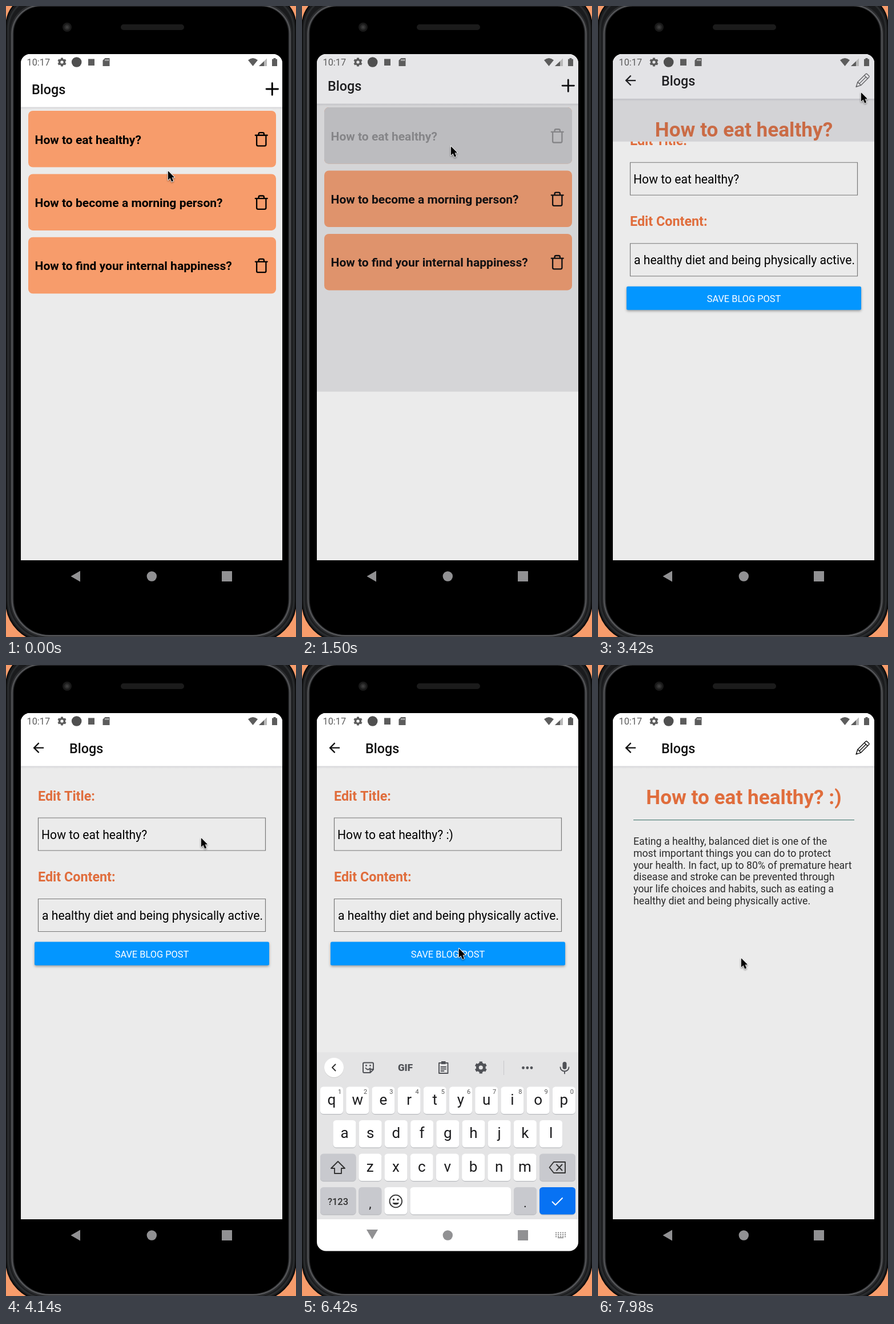
Animation of 508 by 1102 pixels, one loop 8 s. Source, as an HTML page with a canvas:

```html
<!DOCTYPE html>
<html lang="en">
<head>
<meta charset="utf-8">
<title>Blog app</title>
<style>
html, body { margin: 0; width: 100%; height: 100%; overflow: hidden; background: #f79c6b; }
canvas { display: block; width: 508px; height: 1102px; }
</style>
</head>
<body>
<canvas width="508" height="1102"></canvas>
<script>
const c = document.querySelector('canvas').getContext('2d');
const LOOP = 8000, X = 26, Y = 84, W = 458, H = 884, DP = 1.164;
const ORANGE = '#f79c6b', TITLE = '#e06d3c', PAPER = '#ebebeb', GREY = '#5c5c5c', KEY_ICON = '#505257';

// Moments of the story, in ms
const OPEN = 1464, EDIT = 3287, FOCUS = 4180, SAVE = 7000, SLIDE = 425;
const KEYSTROKES = [5150, 5430, 5700];
const POINTER = [
  [300, 283, 286], [1000, 260, 243], [1750, 260, 243], [2400, 415, 178], [2980, 460, 149],
  [3420, 460, 149], [3880, 341, 300], [5780, 341, 300], [6400, 274, 493], [6800, 270, 497],
  [7050, 270, 497], [7700, 250, 510]
];
const BODY = [
  'Eating a healthy, balanced diet is one of the',
  'most important things you can do to protect',
  'your health. In fact, up to 80% of premature heart',
  'disease and stroke can be prevented through',
  'your life choices and habits, such as eating a',
  'healthy diet and being physically active.'
];

const clamp = v => Math.max(0, Math.min(1, v));
const mix = (a, b, k) => a + (b - a) * k;
const ramp = (t, start, length) => clamp((t - start) / length);
const smooth = k => k * k * (3 - 2 * k);

// cubic-bezier(.20833, .82, .25, 1)
function slide(k) {
  const curve = (s, a, b) => 3 * (1 - s) * (1 - s) * s * a + 3 * (1 - s) * s * s * b + s * s * s;
  if (k <= 0 || k >= 1) return clamp(k);
  let lo = 0, hi = 1;
  for (let i = 0; i < 24; i++) {
    const mid = (lo + hi) / 2;
    if (curve(mid, .20833, .25) < k) lo = mid; else hi = mid;
  }
  return curve(lo, .82, 1);
}

// Drawing helpers
function text(s, x, y, size, color, weight = 400, align = 'left') {
  c.font = `${weight} ${size}px Roboto, sans-serif`;
  c.textAlign = align;
  c.fillStyle = color;
  c.fillText(s, x, y);
}
function rect(x, y, w, h, color) {
  c.fillStyle = color;
  c.fillRect(x, y, w, h);
}
function box(x, y, w, h, r, fill, stroke, width = 1) {
  c.beginPath();
  c.roundRect(x, y, w, h, r);
  if (fill) { c.fillStyle = fill; c.fill(); }
  if (stroke) { c.strokeStyle = stroke; c.lineWidth = width; c.stroke(); }
}
function disc(x, y, r, color) {
  c.beginPath();
  c.arc(x, y, r, 0, 7);
  c.fillStyle = color;
  c.fill();
}
function shape(d, x, y, scale, fill, stroke, width = 2) {
  const p = new Path2D(d);
  c.save();
  c.translate(x, y);
  c.scale(scale, scale);
  c.lineCap = c.lineJoin = 'round';
  if (stroke) { c.strokeStyle = stroke; c.lineWidth = width; c.stroke(p); }
  if (fill) { c.fillStyle = fill; c.fill(p); }
  c.restore();
}
function faded(alpha, draw) {
  c.save();
  c.globalAlpha *= alpha;
  draw();
  c.restore();
}
function gear(x, y, r, color) {
  c.strokeStyle = color;
  c.lineCap = 'butt';
  c.beginPath();
  c.arc(x, y, r * .57, 0, 7);
  c.lineWidth = r * .46;
  c.stroke();
  c.beginPath();
  for (let i = 0; i < 6; i++) {
    const a = i * Math.PI / 3 + Math.PI / 6;
    c.moveTo(x + Math.cos(a) * r * .6, y + Math.sin(a) * r * .6);
    c.lineTo(x + Math.cos(a) * r, y + Math.sin(a) * r);
  }
  c.lineWidth = r * .5;
  c.stroke();
}

function phone() {
  rect(0, 0, 508, 1102, ORANGE);
  box(0, -22, 508, 1132, [58, 58, 70, 70], '#1a1b1d', '#0a0a0a', 2);
  box(4, -16, 500, 1122, [56, 56, 68, 68], null, '#2a2c2e', 3);
  box(10.5, -2, 487, 1103, [50, 50, 65, 65], '#000', '#2b2c2e', 6);
  box(10.5, -1, 487, 1101, [50, 50, 65, 65], null, '#58595c', 2);
  disc(107, 37, 8, '#191919');
  disc(107, 37, 5, '#2b2b2b');
  disc(107, 37, 2.5, '#3c3c3c');
  box(201, 32, 111, 10, 5, '#1b1b1b');
}

function statusBar() {
  text('10:17', 36.5, 104, 16.3, GREY);
  gear(98, 98, 7.6, GREY);
  disc(123.7, 98, 8.8, '#4f4f4f');
  rect(144, 92.5, 11, 11.5, GREY);
  shape('M4 0h8v14H0V4z', 169.5, 91, 1, GREY);
  for (const x of [173.5, 176, 178.5]) rect(x, 93, 1.3, 3, '#ddd');
  shape('M0 3.5Q8.5-3.5 17 3.5L8.5 14z', 424, 91, 1, GREY);
  shape('M14 0V13.5H0z', 443, 91.5, 1, '#b9b9b9');
  shape('M9 5V13.5H0z', 443, 91.5, 1, GREY);
  shape('M2.5 0h4v1.7H9V14H0V1.7h2.5z', 466, 91, 1, GREY);
}

function page(titleX) {
  rect(X, Y, W, H + 60, PAPER);
  rect(X, Y, W, 93, '#fff');
  const g = c.createLinearGradient(0, 176, 0, 181);
  g.addColorStop(0, '#d3d3d6');
  g.addColorStop(1, PAPER);
  rect(X, 176.5, W, 4.5, g);
  text('Blogs', titleX, 154, 23.35, '#111', 500);
}
function backArrow() {
  shape('M20 11H7.83l5.59-5.59L12 4l-8 8 8 8 1.41-1.41L7.83 13H20z', 42.8, 130.7, DP, '#111');
}

function listPage(t) {
  page(45);
  shape('M12 5v14M5 12h14', 448.8, 127.5, 1.458, null, '#000');
  const press = ramp(t, 1310, 110) * (1 - ramp(t, 1500, 250));
  ['How to eat healthy?', 'How to become a morning person?', 'How to find your internal happiness?'].forEach((s, i) => {
    const y = 183 + i * 110.4, held = i ? 0 : press;
    box(39, y, 434, 98.5, 8, ORANGE);
    if (held) faded(held, () => box(39, y, 434, 98.5, 8, '#cdcdcf'));
    faded(1 - held * .68, () => {
      text(s, 50.5, y + 57.5, 21.05, '#000', 700);
      shape('M3 6h18M19 6v14a2 2 0 0 1-2 2H7a2 2 0 0 1-2-2V6m3 0V4a2 2 0 0 1 2-2h4a2 2 0 0 1 2 2v2',
        433.3, y + 35.8, DP, null, '#000');
    });
  });
}

function detailPage(t) {
  page(111);
  backArrow();
  const press = ramp(t, 2890, 110) * (1 - smooth(ramp(t, EDIT, 250)));
  faded(1 - press * .8, () => {
    c.save();
    c.translate(462.7, 145.3);
    c.rotate(Math.PI / 4);
    shape('M0 15L-4 7V-12.5Q-4-14.5-2-14.5H2Q4-14.5 4-12.5V7zM-4-9.5H4M-4 7H4M0 7V-9.5M-1 13h2',
      0, 0, 1, null, '#111', 1.4);
    c.restore();
  });
  text('How to eat healthy?' + (t > SAVE - 50 ? ' :)' : ''), 255.5, 243, 35.15, TITLE, 700, 'center');
  rect(62, 270, 387, 1.2, '#4f8078');
  BODY.forEach((s, i) => text(s, 62, 314.2 + i * 20.7, 17.72, '#2b2b2b'));
}

function editPage(t) {
  page(111);
  backArrow();
  const typed = KEYSTROKES.filter(k => t >= k).length;
  const value = 'How to eat healthy?' + ' :)'.slice(0, typed);
  text('Edit Title:', 56, 236.5, 23.35, TITLE, 700);
  box(56.5, 267, 398, 57, 0, null, '#777', 1.2);
  text(value, 62, 303.5, 21.15, '#000');
  const since = t - (typed ? KEYSTROKES[typed - 1] : FOCUS);
  if (t > FOCUS && t < SAVE && since % 1000 < 500)
    rect(62.5 + c.measureText(value).width, 282, 2, 28, '#3f5f5c');
  text('Edit Content:', 56, 378, 23.35, TITLE, 700);
  box(56.5, 408.5, 398, 57, 0, null, '#777', 1.2);
  text('a healthy diet and being physically active.', 63, 445, 21.15, '#000');
  c.save();
  c.shadowColor = 'rgba(0,0,0,.35)';
  c.shadowBlur = 4;
  c.shadowOffsetY = 2;
  box(50, 483.5, 411, 41, 2.5, '#0396ff');
  c.restore();
  text('SAVE BLOG POST', 255.5, 510.5, 16.4, '#fff', 400, 'center');
}

// A page is revealed upward from the bottom while the one below drifts up and dims
function card(draw, t, shown, covered) {
  if (!shown) return;
  if (shown < 1) rect(X, Y, W, H, `rgba(100,100,112,${.175 * clamp(shown / .36)})`);
  c.save();
  c.beginPath();
  c.rect(X, Y + H * (1 - shown), W, H);
  c.clip();
  c.translate(0, H * (.041 * (1 - shown) - .02 * covered));
  draw(t);
  c.restore();
}

function key(x, y, w, label, fill = '#fff', size = 26) {
  box(x, y + 1.2, w, 47.5, 5.5, '#b9bbbf');
  box(x, y, w, 47.5, 5.5, fill);
  text(label, x + w / 2, y + 31, size, '#1b1b1d', 400, 'center');
}
function keyboard() {
  const step = 45.2, special = '#c8c9ce';
  rect(X, 676.5, W, 291.5, '#e4e4e5');
  disc(56, 704, 17, '#ccc');
  disc(56, 703, 17, '#fff');
  shape('M58.5 697.5L53 703l5.5 5.5', 0, 0, 1, null, '#333');
  shape('M109 694.5h14q2 0 2 2v10l-5.5 5.5H109q-2 0-2-2v-13.5q0-2 2-2zM125 706h-5.5v6M111.5 704q4 5 8 0',
    0, 0, 1, null, KEY_ICON);
  disc(112.5, 699.5, 1.4, KEY_ICON);
  disc(119.5, 699.5, 1.4, KEY_ICON);
  text('GIF', 181, 708.8, 17, KEY_ICON, 800, 'center');
  shape('M240 695h15.5v18H240zM243.5 702h8.5M243.5 705.5h8.5M243.5 709h5', 0, 0, 1, null, KEY_ICON, 1.9);
  rect(244, 692, 7.5, 5, KEY_ICON);
  gear(313.3, 703, 10.5, KEY_ICON);
  rect(353, 691, 1, 25, '#c6c7ca');
  for (const x of [387.5, 394.8, 402]) disc(x, 703.5, 2.4, KEY_ICON);
  box(456.5, 693, 7, 13, 3.5, KEY_ICON);
  shape('M452.5 702.5a7.5 7 0 0 0 15 0M460 710v3.5', 0, 0, 1, null, KEY_ICON, 1.9);

  [...'qwertyuiop'].forEach((s, i) => {
    key(32 + i * step, 736.5, 40, s);
    text((i + 1) % 10, 66 + i * step, 748.5, 11, '#555', 400, 'center');
  });
  [...'asdfghjkl'].forEach((s, i) => key(54.5 + i * step, 795, 40, s));
  [...'zxcvbnm'].forEach((s, i) => key(99.3 + i * step, 853.5, 40, s));
  key(32, 853.5, 62.5, '', special);
  shape('M63 867l-12 12h6v9h12v-9h6z', 0, 0, 1, null, '#333', 1.9);
  key(416, 853.5, 63, '', special);
  shape('M441 868h20v19h-20l-7.5-9.5zM446 872.5l9.5 10M455.5 872.5l-9.5 10', 0, 0, 1, null, '#333', 1.9);
  key(32, 912, 62.5, '', special);
  text('?123', 63, 943, 16.5, '#333', 500, 'center');
  key(99.3, 912, 40, '', special);
  text(',', 119.3, 948, 22, '#1b1b1d', 400, 'center');
  key(144.5, 912, 40, '');
  c.beginPath();
  c.arc(164.3, 936.5, 10.8, 0, 7);
  c.strokeStyle = '#333';
  c.lineWidth = 1.8;
  c.stroke();
  disc(160.5, 933.5, 1.7, '#333');
  disc(168, 933.5, 1.7, '#333');
  shape('M158.5 939a6 5 0 0 0 11.5 0z', 0, 0, 1, '#333');
  key(189.5, 912, 176.5, '');
  key(371, 912, 40, '', special);
  text('.', 391, 947, 22, '#1b1b1d', 400, 'center');
  key(416, 912, 63, '', '#0772f3');
  shape('M438.5 937.5l5.5 5.5 12-12', 0, 0, 1, null, '#fff', 1.9);
}

function navBar(open) {
  const color = '#919193';
  if (open) {
    shape('M113 986h20L123 1003z', 0, 0, 1, color);
    for (let i = 0; i < 15; i++)
      rect(444 + (i % 5) * 4, 990.5 + Math.floor(i / 5) * 3.4, 2.2, 2, '#8f8f8f');
    rect(448, 999.5, 10, 1.6, '#8f8f8f');
  } else shape('M130 986.5v19L113.5 996z', 0, 0, 1, color);
  disc(255.3, 996, 8.7, color);
  rect(378, 987, 18, 18, color);
}

function pointer(t) {
  let i = POINTER.findIndex(p => p[0] > t);
  if (i < 0) i = POINTER.length;
  const a = POINTER[Math.max(0, i - 1)], b = POINTER[Math.min(i, POINTER.length - 1)];
  const k = smooth(ramp(t, a[0], b[0] - a[0] || 1));
  c.save();
  c.shadowColor = 'rgba(0,0,0,.3)';
  c.shadowBlur = 3;
  c.shadowOffsetY = 1.5;
  shape('M1 1V18.5L5 14.8 8 21.8 11.2 20.4 8.2 13.6H13.4z', mix(a[1], b[1], k), mix(a[2], b[2], k) + 1, .9, '#000', '#fff', 2.2);
  c.restore();
}

function frame() {
  const t = performance.now() % LOOP;
  const detail = slide(ramp(t, OPEN, SLIDE));
  const edit = slide(ramp(t, EDIT, SLIDE)) - slide(ramp(t, SAVE, SLIDE));
  const leaving = ramp(t, SAVE, 200);
  const typing = t > FOCUS && leaving < 1;

  phone();
  c.save();
  c.beginPath();
  c.roundRect(X, Y, W, typing ? 939.5 : H, typing ? 16 : [16, 16, 0, 0]);
  c.clip();
  card(listPage, t, 1, detail);
  card(detailPage, t, detail, edit);
  card(editPage, t, edit, 0);
  statusBar();
  if (typing) {
    const rest = (1 - ramp(t, FOCUS, 350)) ** 2;
    faded(ramp(t, FOCUS, 150) * (1 - leaving), () => {
      rect(X, 967, W, 60, '#fff');
      c.translate(0, 29 * (rest + leaving * leaving));
      keyboard();
    });
  }
  c.restore();
  navBar(typing);
  pointer(t);
  requestAnimationFrame(frame);
}
frame();
</script>
</body>
</html>
```
